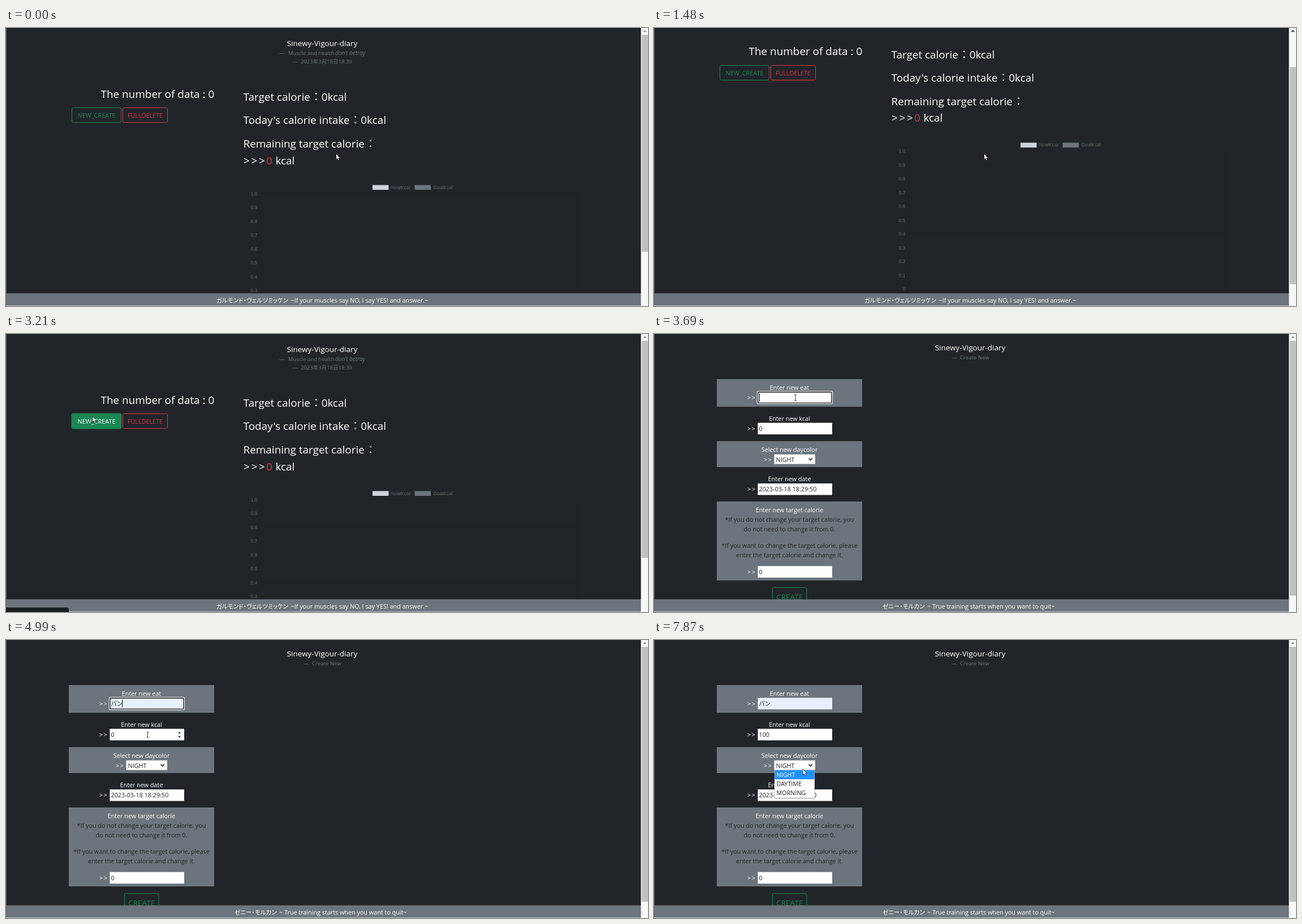
These frames come from a looping animation (1135x493 px, 8 s). An HTML page:

```html
<!DOCTYPE html>
<html lang="ja">
<head>
<meta charset="utf-8">
<title>Calorie diary</title>
<style>
  html, body { margin: 0; width: 100%; height: 100%; overflow: hidden; background: #212529; }
  svg { display: block; width: 100%; height: 100%; }
  text {
    font: 10.8px "Open Sans", "Noto Sans CJK JP", "Noto Sans CJK", sans-serif;
    font-feature-settings: "palt";
    white-space: pre;
  }
  .chart { font-family: "Liberation Sans", Arial, sans-serif; }
  .title { font-weight: 500; }
  .slanted { font-style: italic; }
</style>
</head>
<body>
<svg id="stage" viewBox="0 0 1135 493" preserveAspectRatio="none"></svg>
<script>
const LOOP = 8000, STEP = 70, BLINK = 500;
const BG = '#212529', GRAY = '#6c757d', GREEN = '#198754', RED = '#dc3545', WHITE = '#fff';
const TITLE = 'Sinewy-Vigour-diary';
const stage = document.getElementById('stage');

function set(el, attrs) {
  for (const k in attrs) el.setAttribute(k, attrs[k]);
}
function add(parent, tag, attrs = {}) {
  const el = document.createElementNS('http://www.w3.org/2000/svg', tag);
  set(el, attrs);
  return parent.appendChild(el);
}
const group = p => add(p, 'g');
const rect = (p, x, y, width, height, fill, more) =>
  add(p, 'rect', { x, y, width, height, fill, ...more });
const path = (p, d, more) => add(p, 'path', { d, fill: 'none', ...more });
function label(p, str, x, y, fill = WHITE, size = 10.8, more = {}) {
  const el = add(p, 'text', { x, y, fill, ...more });
  el.textContent = str;
  el.style.fontSize = size + 'px';
  return el;
}
const mid = { 'text-anchor': 'middle' }, end = { 'text-anchor': 'end' };
const show = (el, on) => set(el, { opacity: +on });

function ramp(t, from, to) {
  if (t < from) return 0;
  const steps = ms => Math.floor(ms / STEP) + 1;
  const p = Math.min(1, steps(t - from) / steps(to - from));
  return p * p * (3 - 2 * p);
}

rect(stage, 0, 0, 1135, 493, BG);

// ---------- overview page ----------
const home = group(stage);
const body = group(home);
label(body, TITLE, 559, 31.5, WHITE, 13.5, { ...mid, class: 'title' });
label(body, '—', 483, 47.5, GRAY, 9.5);
label(body, 'Muscle and health', 499, 47.5, GRAY, 9.55);
label(body, "don't betray", 582, 47.5, GRAY, 10, { class: 'slanted' });
label(body, '—', 506, 62.5, GRAY, 9.5);
label(body, '2023年3月18日18:39', 521, 62.5, GRAY, 9.5);

const big = (str, x, y, fill, more) => label(body, str, x, y, fill, 18.9, more);
big('The number of data : 0', 167.5, 123.5);
['Target calorie', "Today's calorie intake", 'Remaining target calorie'].forEach((str, i) => {
  const y = 129 + i * 41.3;
  const right = 419.5 + big(str, 419.5, y).getComputedTextLength();
  big('：', right + 10.5, y, WHITE, mid);
  if (i < 2) big('0kcal', right + 20, y);
});
big('>>>', 420, 241.5, WHITE, { 'letter-spacing': 2.7 });
big('0', 460, 241.5, RED);
big('kcal', 476.5, 241.5);

const ring = rect(body, 115, 140, 90, 29, GREEN, { rx: 4, 'fill-opacity': 0.5 });
const newBtn = rect(body, 116.5, 141.5, 87, 26, BG, { rx: 2.5, stroke: GREEN });
const newText = label(body, 'NEW_CREATE', 160, 159, GREEN, 10.9, mid);
rect(body, 206.5, 141.5, 79, 26, 'none', { rx: 2.5, stroke: RED });
label(body, 'FULLDELETE', 246, 159, RED, 10.8, mid);

const tiny = (str, x, y, more) => label(body, str, x, y, '#666', 8.5, { class: 'chart', ...more });
['NowKcar', 'GoalKcal'].forEach((str, i) => {
  const x = 648 + i * 74.5;
  rect(body, x, 278.5, 28.5, 8.5, i ? GRAY : '#ced4da');
  tiny(str, x + 32.8, 285.5);
});
const grid = { stroke: '#000', 'stroke-opacity': 0.1, 'stroke-width': 0.8 };
for (let i = 0; i <= 10; i++) {
  const y = 293.5 + i * 24.5;
  tiny(i < 10 ? (1 - i / 10).toFixed(1) : '0', 444.5, y + 3, end);
  path(body, `M445 ${y}H1011`, grid);
}
path(body, 'M449.5 293.5V543M1010.5 293.5V543', grid);
tiny('KCAL', 730, 555, mid);

// ---------- form page ----------
const form = group(stage);
label(form, TITLE, 559, 28.5, WHITE, 13.5, { ...mid, class: 'title' });
label(form, '—', 526, 44.5, GRAY, 9.5);
label(form, 'Create New', 541, 44.5, GRAY, 9.6);

const centred = (str, y, fill) => label(form, str, 239.5, y, fill, 10.8, mid);
const panel = (y, h) => rect(form, 111, y, 257, h, GRAY);
const prompt = (x, y) => label(form, '>>', x, y, WHITE, 10.8, { 'letter-spacing': 1.6 });

function field(y, value) {
  prompt(165, y + 14);
  const box = rect(form, 183.5, y, 131.5, 20.5, WHITE);
  const focus = group(form);
  rect(focus, 182.5, y - 0.8, 133, 22, 'none', { rx: 1.8, stroke: WHITE, 'stroke-width': 1.2 });
  rect(focus, 183.8, y + 0.5, 130.4, 19.4, 'none', { rx: 1, stroke: '#101010', 'stroke-width': 1.4 });
  const text = label(form, value, 185.5, y + 14.2, BG);
  const caret = rect(form, 186, y + 3, 1, 14, '#000');
  show(focus, 0);
  show(caret, 0);
  const hit = (px, py) => px > 183 && px < 315 && py > y && py < y + 20.5;
  return { box, focus, text, caret, hit };
}

panel(80, 49);
centred('Enter new eat', 98.5);
const eat = field(102.5, '');

centred('Enter new kcal', 153.5);
const kcal = field(157.5, '0');
const spinner = path(form, 'M304 165.5l2.7-3 2.7 3zM304 170.5l2.7 3 2.7-3z', { fill: '#333' });

panel(190, 46);
centred('Select new daycolor', 208.5);
prompt(194, 226.5);
rect(form, 212.5, 213.5, 72.5, 17, WHITE);
label(form, 'NIGHT', 215.5, 226.5, BG);
path(form, 'M273.5 220.5l3.2 3.2 3.2-3.2', { stroke: '#111', 'stroke-width': 1.5 });

centred('Enter new date', 261);
field(265, '2023-03-18 18:29:50');

panel(297, 140);
centred('Enter new target calorie', 315.5);
centred('*If you do not change your target calorie, you', 333, BG);
centred('do not need to change it from 0.', 350, BG);
centred('*If you want to change the target calorie, please', 379, BG);
centred('enter the target calorie and change it.', 396, BG);
field(411.5, '0');

rect(form, 209.5, 449.5, 60.5, 35, 'none', { rx: 3, stroke: GREEN });
label(form, 'CREATE', 239.7, 471.3, GREEN, 13.5, mid);

const DISHES = ['パン', 'a', 'キャベツ', '米', 'dd', 'aa'], ROW = 32.2;
const popup = group(form);
rect(popup, 229, 134, 67.5, 198.5, '#000', { rx: 3, opacity: 0.25 });
path(popup, 'M243.5 134.5l6-9.5 6 9.5z', { fill: '#2b2c2d' });
rect(popup, 230, 134, 65.5, 197, '#2b2c2d', { rx: 2 });
const hover = rect(popup, 230, 134, 65.5, ROW, '#3f4041');
DISHES.forEach((str, i) => label(popup, str, 240.5, 154 + i * ROW, WHITE, 11));

const list = group(form);
rect(list, 212, 230, 73, 51.5, '#000', { rx: 2, opacity: 0.25 });
rect(list, 213, 230.5, 71, 49, WHITE);
rect(list, 213.5, 231, 70, 16, '#1e90ff');
['NIGHT', 'DAYTIME', 'MORNING'].forEach((str, i) =>
  label(list, str, 216.5, 243 + i * 16.1, i ? BG : WHITE));

// ---------- footer, window edges, scrollbar ----------
rect(stage, 0, 470.5, 1123, 22.5, GRAY);
function quote(name, x, str) {
  const g = group(stage);
  label(g, name, x - 4.5, 486.5, WHITE, 10.6, end);
  label(g, str, x, 486.5);
  return g;
}
const homeQuote = quote('ガルモンド・ヴェルツミッケン', 503.5, '~If your muscles say NO, I say YES! and answer.~');
const formQuote = quote('ゼニー・モルカン', 483, '~ True training starts when you want to quit~');
rect(stage, 0, 0, 1, 493, '#5c6166');
rect(stage, 0, 492, 1135, 1, '#c3c6c9');
const status = path(stage, 'M0 485H107q4 0 4 4V493H0z', { fill: '#1b1d20' });
rect(stage, 1122.5, 0, 12.5, 493, '#f8f8f8');
const thumb = rect(stage, 1124, 12, 11, 385, '#c1c1c1');
const upArrow = path(stage, 'M1126 7l3.5-4 3.5 4z');

// ---------- pointer ----------
const arrow = path(stage, 'M0 0V10L2.3 8 4 11.6 5.7 10.9 4.1 7.4H7.2z',
  { fill: WHITE, stroke: '#000', 'stroke-width': 0.6 });
const beam = path(stage, 'M-2-5H-.6L0-4.5.6-5H2M0-4.5V4.5M-2 5H-.6L0 4.5.6 5H2',
  { stroke: '#222', 'stroke-width': 0.9 });

// Glides: start, finish, x, y
const GLIDES = [
  [1850, 1850, 577, 228],
  [2070, 2240, 349, 196],
  [2490, 2800, 153, 146],
  [3360, 3585, 250, 113],
  [4060, 4320, 249, 172],
  [4400, 4490, 249, 154.5],
  [4830, 4990, 250.5, 168],
  [7150, 7460, 263, 229]
];
function pointerAt(t) {
  let x = 583.5, y = 223;
  for (const [from, to, nx, ny] of GLIDES) {
    const p = ramp(t, from, to);
    x += (nx - x) * p;
    y += (ny - y) * p;
  }
  return [x, y];
}

const OPEN_FORM = 3270, FOCUS_EAT = 3660, PICK = 4830, FOCUS_KCAL = 5170, ERASE = 6080, OPEN_LIST = 7700;
const KEYS = [6240, 6570, 6730];

function drawHome(t, px) {
  const y = 89 * (ramp(t, 410, 560) - ramp(t, 1420, 1630));
  set(body, { transform: `translate(0 ${-y})` });
  const over = px < 203;
  set(newBtn, { fill: over ? GREEN : BG });
  set(newText, { fill: over ? WHITE : GREEN });
  show(ring, t >= 3030);
  return y;
}

function drawForm(t, px, py) {
  const choosing = t >= 4060 && t < PICK;
  const row = choosing ? Math.floor((py - 134) / ROW) : t < PICK ? -1 : 0;
  const dish = DISHES[row] || '';
  const eating = t >= FOCUS_EAT && t < FOCUS_KCAL;
  eat.text.textContent = dish;
  set(eat.box, { fill: dish ? '#e8f0fe' : WHITE });
  set(eat.caret, { x: dish ? 205 : 186 });
  show(eat.focus, eating);
  show(eat.caret, eating && !choosing);
  show(popup, ramp(t, 3735, 3810) - ramp(t, PICK, 4990));
  set(hover, { y: 134 + Math.max(0, row) * ROW });
  show(hover, row >= 0);

  const typed = KEYS.filter(k => t >= k);
  const amount = t < ERASE ? '0' : '100'.slice(0, typed.length);
  const lastEdit = Math.max(t < ERASE ? FOCUS_KCAL : ERASE, ...typed);
  const counting = t >= FOCUS_KCAL && t < OPEN_LIST;
  kcal.text.textContent = amount;
  set(kcal.caret, { x: 185.6 + amount.length * 6.2 });
  show(kcal.focus, counting);
  show(kcal.caret, counting && (t - lastEdit) % (2 * BLINK) < BLINK);
  show(spinner, counting || !choosing && kcal.hit(px, py));
  show(list, ramp(t, OPEN_LIST, 7870));
  return !choosing && (eat.hit(px, py) || kcal.hit(px, py));
}

function draw(t) {
  const onForm = t >= OPEN_FORM;
  const [px, py] = pointerAt(t);
  [home, homeQuote].forEach(el => show(el, !onForm));
  [form, formQuote].forEach(el => show(el, onForm));
  const scroll = drawHome(t, px);
  const typing = drawForm(t, px, py) && onForm;

  set(thumb, { y: 12 + scroll * 68 / 89, height: onForm ? 452 : 385 });
  set(upArrow, { fill: scroll ? '#505050' : '#a3a3a3' });
  show(status, t >= 2720 && t < 3435);

  const transform = `translate(${px} ${py})`;
  set(arrow, { transform });
  set(beam, { transform });
  show(arrow, !typing);
  show(beam, typing);
}

const start = performance.now();
function tick() {
  draw((performance.now() - start) % LOOP);
  requestAnimationFrame(tick);
}
tick();
</script>
</body>
</html>
```
